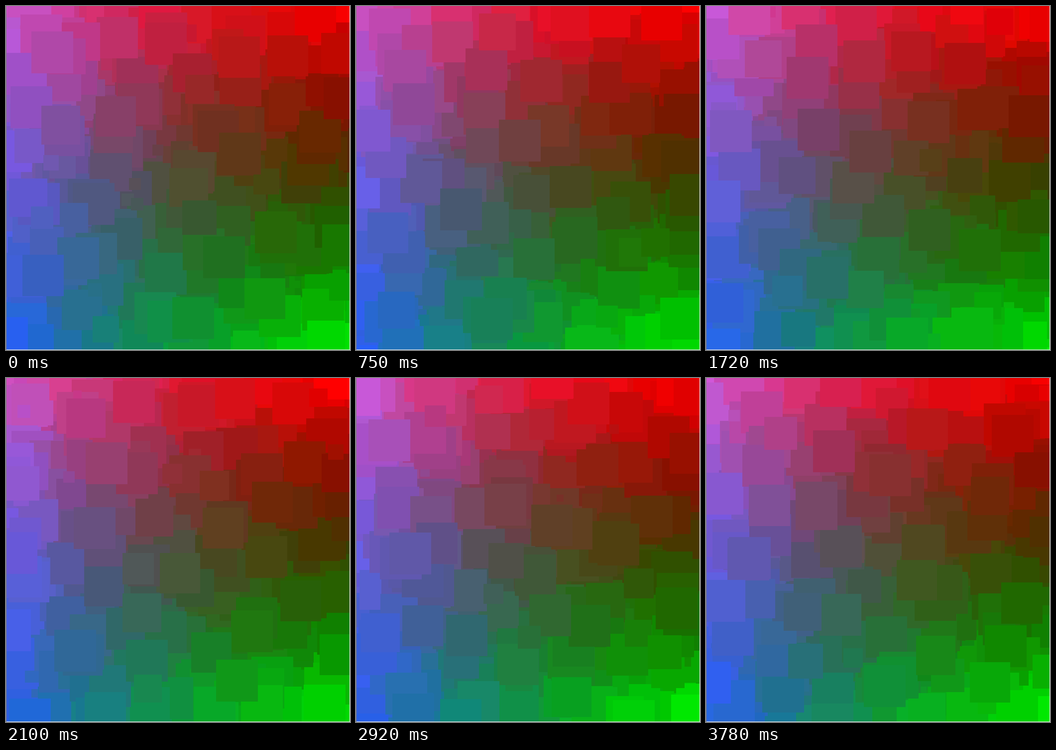
These frames come from a looping animation (691x690 px, 3.88 s). An HTML page with a canvas:

```html
<!DOCTYPE html>
<html lang="en">
<head>
<meta charset="utf-8">
<title>Colour squares</title>
<style>
  html, body { margin: 0; width: 100%; height: 100%; overflow: hidden; background: #f0f0f0; }
  canvas { display: block; }
</style>
</head>
<body>
<canvas id="stage" width="691" height="690"></canvas>
<script>
const ctx = document.getElementById('stage').getContext('2d');
const LOOP = 3880, FIELD = 689, SIDE = 84, COUNT = 650;

// Pace of the repaints: step number and time in ms, evenly spaced in between
const pace = [[0, 0], [1, 40], [10, 1320], [15, 1970], [25, 3320], [28, 3780], [29, LOOP]];

// Square roots of the corner levels per channel: top left, top right, bottom left, bottom right
const corners = [
  [14.4, 16, 6.3, 0],
  [9.4, 0, 9.8, 15.5],
  [14.7, 0, 15.7, 0]
];

const clamp = v => Math.min(1, Math.max(0, v));
const mix = (a, b, t) => a + (b - a) * t;

function stepAt(time) {
  const i = pace.findIndex(([, end]) => time < end);
  const [n0, t0] = pace[i - 1], [n1, t1] = pace[i];
  return Math.floor(mix(n0, n1, (time - t0) / (t1 - t0)));
}

function colourAt(x, y) {
  const u = clamp(x / FIELD), v = clamp(y / FIELD);
  const rgb = corners.map(([tl, tr, bl, br]) => {
    const root = mix(mix(tl, tr, u), mix(bl, br, u), v);
    return Math.min(255, Math.round(root * root / 8) * 8);
  });
  return `rgb(${rgb})`;
}

// A square takes the colour of the field at its centre
function square(x, y, side) {
  ctx.fillStyle = colourAt(x, y);
  ctx.fillRect(Math.round(x - side / 2), Math.round(y - side / 2), side, side);
}

function randomFrom(seed) {
  return () => {
    seed = (seed + 0x6D2B79F5) | 0;
    let t = Math.imul(seed ^ (seed >>> 15), seed | 1);
    t ^= t + Math.imul(t ^ (t >>> 7), t | 61);
    return ((t ^ (t >>> 14)) >>> 0) / 4294967296;
  };
}

function paint(step) {
  const random = randomFrom(step * 7919 + 17);
  ctx.fillStyle = '#808080';
  ctx.fillRect(0, 0, 1, 690);
  ctx.save();
  ctx.translate(1, 0);
  ctx.beginPath();
  ctx.rect(0, 0, FIELD, FIELD);
  ctx.clip();

  // Gapless ground
  const gap = FIELD / 12;
  for (let y = 0; y <= 12; y++) {
    for (let x = 0; x <= 12; x++) square(x * gap, y * gap, SIDE);
  }
  // Pile of squares, most of them full size
  for (let i = 0; i < COUNT; i++) {
    const side = Math.round(SIDE * (1 - 0.85 * random() ** 6));
    square(random() * FIELD, random() * FIELD, side);
  }
  ctx.restore();
}

let shown = -1;
function tick() {
  const step = stepAt(performance.now() % LOOP);
  if (step !== shown) paint(shown = step);
  requestAnimationFrame(tick);
}
tick();
</script>
</body>
</html>
```
